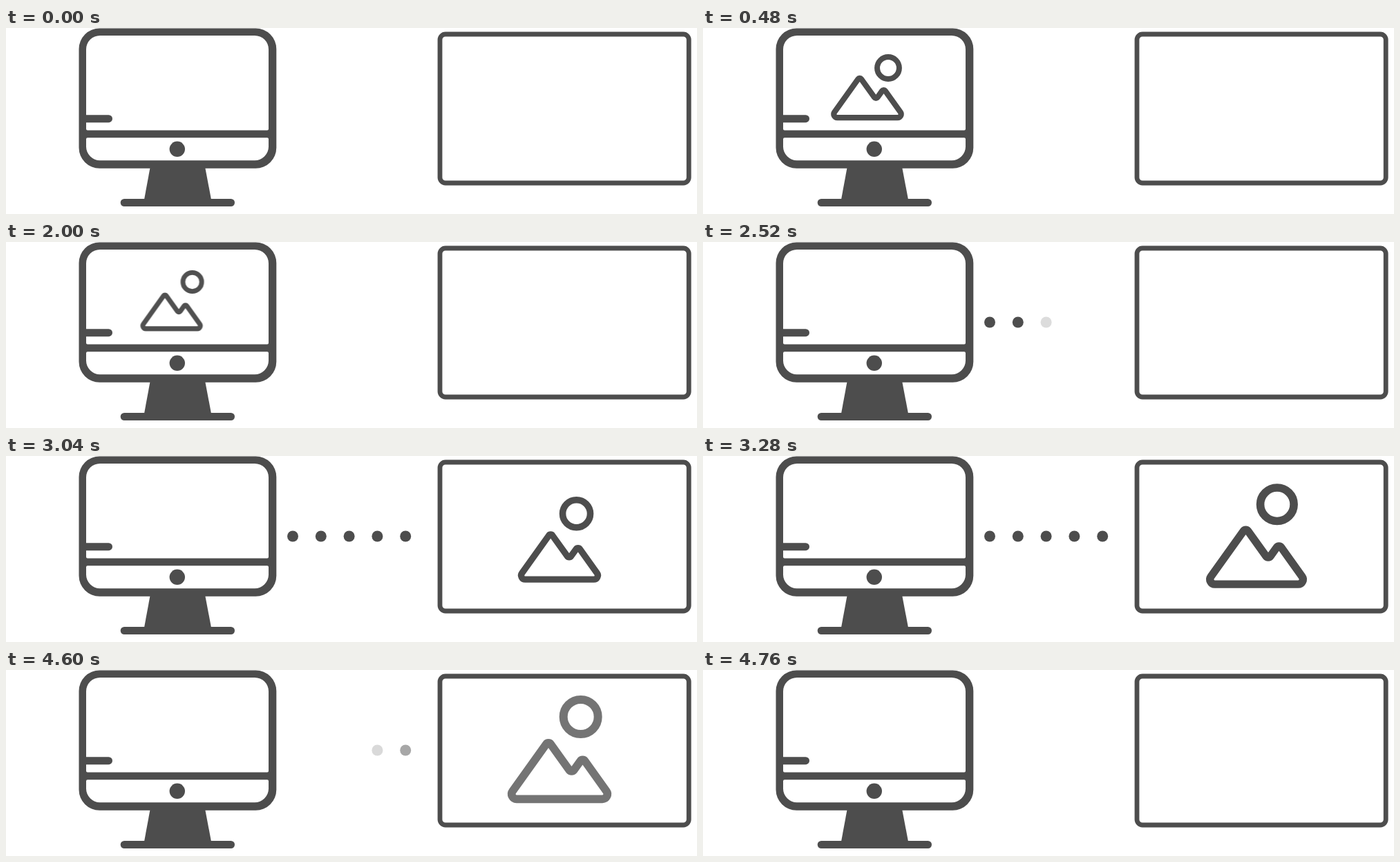
These frames come from a looping animation (1000 px wide and 270 px high, 4.8 s). An HTML page with a canvas:

```html
<!DOCTYPE html>
<html lang="en">
<head>
<meta charset="utf-8">
<title>Screen sharing</title>
<style>
html, body { margin: 0; width: 100%; height: 100%; overflow: hidden; background: #fff; }
canvas { display: block; }
</style>
</head>
<body>
<canvas id="stage" width="1000" height="270"></canvas>
<script>
const ctx = document.getElementById('stage').getContext('2d');
const LOOP = 4800, STEP = 40, INK = '#4d4d4d';
const clamp = v => Math.min(1, Math.max(0, v));

// Linear growth that runs into a damped spring
function pop(ms) {
  const rise = 150;
  if (ms < rise) return Math.max(0, ms / rise);
  const s = (ms - rise) / 1000;
  return 1 + 0.38 * Math.sin(17.2 * s) * Math.exp(-8.5 * s);
}

function easeInOut(p) {
  return p < 0.5 ? 4 * p ** 3 : 1 - 4 * (1 - p) ** 3;
}

function at(x, y, scale, draw) {
  if (scale <= 0) return;
  ctx.save();
  ctx.translate(x, y);
  ctx.scale(scale, scale);
  draw();
  ctx.restore();
}

function mountain() {
  ctx.beginPath();
  ctx.moveTo(0, 40.8);
  ctx.arcTo(-76, 40.8, -16, -43.5, 7.2);
  ctx.arcTo(-16, -43.5, 17.5, 3.4, 4);
  ctx.arcTo(17.5, 3.4, 33.5, -19, 4);
  ctx.arcTo(33.5, -19, 76, 40.8, 4);
  ctx.arcTo(76, 40.8, 0, 40.8, 7.2);
  ctx.closePath();
  ctx.lineWidth = 11.7;
  ctx.stroke();
}

function ring(x, y, r, width) {
  ctx.beginPath();
  ctx.arc(x, y, r, 0, 7);
  ctx.lineWidth = width;
  ctx.stroke();
}

function disc(x, y, r) {
  ctx.beginPath();
  ctx.arc(x, y, r, 0, 7);
  ctx.fill();
}

function pill(x, y, w, h) {
  ctx.beginPath();
  ctx.roundRect(x, y, w, h, h / 2);
  ctx.fill();
}

function smallPicture(t) {
  const size = pop(t - 290);
  const shift = ms => 200 * easeInOut(clamp((ms - 1960) / 400));
  const blurs = t >= 2000 && t < 2360 ? 16 : 1;
  if (t >= 2360) return;
  ctx.save();
  ctx.beginPath();
  ctx.rect(111, 6, 275, 146);
  ctx.clip();
  // Averaged samples make the motion blur
  ctx.globalCompositeOperation = 'lighter';
  ctx.globalAlpha = 1 / blurs;
  for (let i = 0; i < blurs; i++) {
    const dx = shift(t + (blurs > 1 ? 20 * i / (blurs - 1) : 0));
    at(238 + dx, 101.4, 0.6 * size, mountain);
    at(268 + dx, 58, size, () => ring(0, 0, 13.6, 6.8));
  }
  ctx.restore();
}

function largePicture(t) {
  ctx.globalAlpha = 1 - clamp((t - 4555) / 200);
  at(801, 146.5, pop(t - 2920), () => {
    mountain();
    ring(30.7, -78.5, 25, 12);
  });
  ctx.globalAlpha = 1;
}

function dots(t) {
  for (let i = 0; i < 5; i++) {
    const shown = clamp((t - 2161 - 160 * i) / 200);
    const gone = clamp((t - 4275 - 56 * i) / 200);
    ctx.globalAlpha = shown * (1 - gone);
    disc(415 + 40.8 * i, 116.5, 8);
  }
  ctx.globalAlpha = 1;
}

function screens() {
  ctx.beginPath();
  ctx.roundRect(105.5, 0.5, 285.8, 203.2, 30);
  ctx.roundRect(116, 11, 264, 137.5, [20, 20, 2, 2]);
  ctx.roundRect(116, 159.3, 264, 32.9, [2, 2, 20, 20]);
  ctx.fill('evenodd');
  pill(110, 126.2, 44, 11);
  disc(247.8, 175.8, 11.2);

  ctx.beginPath();
  ctx.moveTo(208.5, 203);
  ctx.lineTo(288.3, 203);
  ctx.lineTo(297, 249);
  ctx.lineTo(200, 249);
  ctx.fill();
  pill(165.7, 248, 165.3, 11);

  ctx.beginPath();
  ctx.roundRect(628, 9, 360.2, 216, 8);
  ctx.lineWidth = 6.8;
  ctx.stroke();
}

function frame(now) {
  const t = Math.floor(now % LOOP / STEP) * STEP;
  ctx.clearRect(0, 0, 1000, 270);
  ctx.fillStyle = ctx.strokeStyle = INK;
  smallPicture(t);
  screens();
  dots(t);
  largePicture(t);
  requestAnimationFrame(frame);
}
requestAnimationFrame(frame);
</script>
</body>
</html>
```
